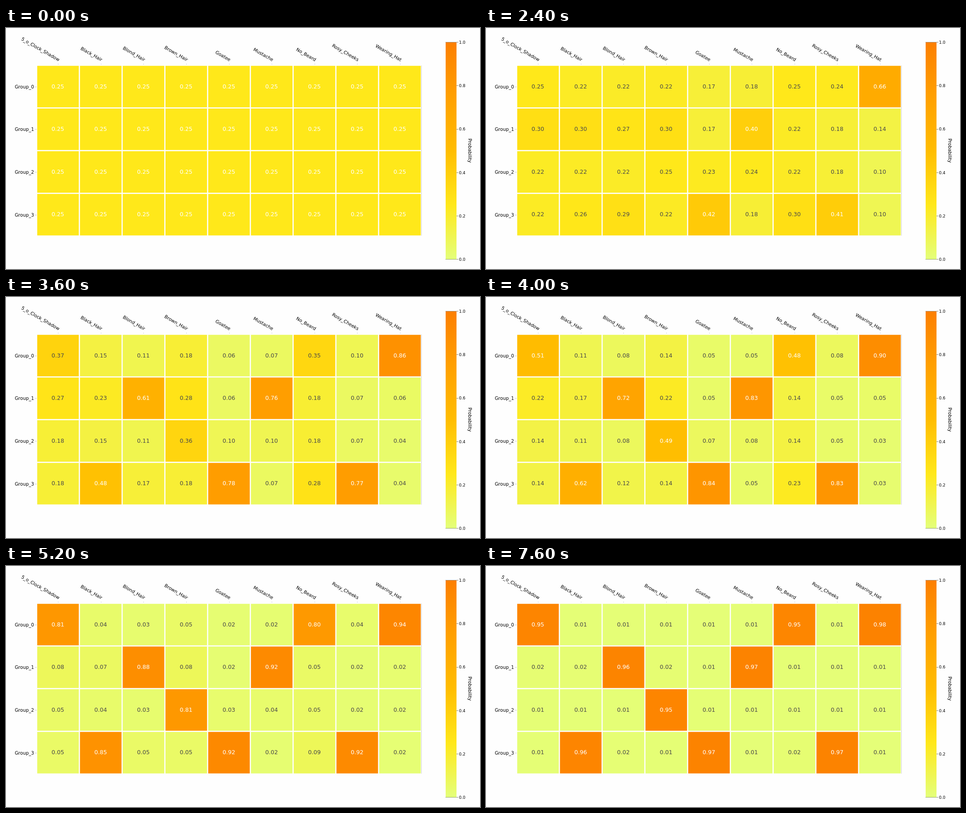
Animation, 1049 px wide and 534 px high, one loop 8 s. Source, as an HTML page with a canvas:

```html
<!DOCTYPE html>
<html lang="en">
<head>
<meta charset="utf-8">
<title>Group probabilities</title>
<style>
  html, body { margin: 0; width: 100%; height: 100%; overflow: hidden; background: #fefefe; }
  canvas { display: block; }
</style>
</head>
<body>
<canvas id="stage" width="1049" height="534"></canvas>
<script>
const ctx = document.getElementById('stage').getContext('2d');
const FONT = '"DejaVu Sans", sans-serif';
const STEP = 400, STEPS = 20, ROWS = 4;
const GRID = { x: 67.8, y: 82.5, size: 94.6, gap: 2.6 };
const BAR = { x: 973, y: 31.7, w: 24, h: 481 };
const STOPS = [[228, 255, 122], [255, 232, 26], [255, 189, 0], [255, 160, 0], [252, 127, 0]];

// top: group that wins, rival: runner-up, start: step at which the winner takes off
const COLUMNS = [
  { name: '5_o_Clock_Shadow', top: 0, rival: 1, start: 8.2 },
  { name: 'Black_Hair', top: 3, rival: 1, start: 7.4 },
  { name: 'Blond_Hair', top: 1, rival: 3, start: 6.5 },
  { name: 'Brown_Hair', top: 2, rival: 1, start: 8.3 },
  { name: 'Goatee', top: 3, rival: 2, start: 4.8 },
  { name: 'Mustache', top: 1, rival: 2, start: 5 },
  { name: 'No_Beard', top: 0, rival: 3, start: 8.4 },
  { name: 'Rosy_Cheeks', top: 3, rival: 0, start: 4.9 },
  { name: 'Wearing_Hat', top: 0, rival: 1, start: 3.1 }
];

// The winner's odds rise from 1:3 along a softened power curve;
// the others share the rest, the rival gaining a little more.
function columnAt({ top, rival, start }, step) {
  const rise = step ? Math.log1p(Math.exp(step - start)) : 0;
  const odds = 1 / 3 + 0.19 * rise ** 1.95;
  const lead = 1 + 0.6 * Math.min(step / 10, 1);
  const share = 1 / (1 + odds) / (ROWS - 2 + lead);
  return Array.from({ length: ROWS }, (_, r) =>
    r === top ? odds / (1 + odds) : r === rival ? share * lead : share);
}

function heat(p) {
  const s = p * 4, i = Math.min(Math.floor(s), 3);
  const mix = STOPS[i].map((a, n) => Math.round(a + (STOPS[i + 1][n] - a) * (s - i)));
  return `rgb(${mix})`;
}

function text(str, x, y, size, align, color = '#000', turn = 0) {
  ctx.save();
  ctx.translate(x, y);
  ctx.rotate(turn);
  ctx.font = `${size}px ${FONT}`;
  ctx.textAlign = align;
  ctx.fillStyle = color;
  ctx.fillText(str, 0, 0);
  ctx.restore();
}

function box(x, y, w, h, color) {
  ctx.fillStyle = color;
  ctx.fillRect(x, y, w, h);
}

function drawAxes() {
  COLUMNS.forEach(({ name }, c) => {
    const x = GRID.x + (c + 0.5) * GRID.size;
    text(name, x + 1, 74.2, 10.2, 'right', '#000', Math.PI / 6);
    box(Math.round(x), 79, 1, 2, '#ccc');
  });
  for (let r = 0; r < ROWS; r++) {
    const y = GRID.y + (r + 0.5) * GRID.size;
    text('Group_' + r, 62, y + 4, 10.2, 'right');
    box(64, Math.round(y), 4, 1, '#ccc');
  }
  box(919, 83, 1, 377, '#d0d0d0');
}

function drawBar() {
  const fill = ctx.createLinearGradient(0, BAR.y + BAR.h, 0, BAR.y);
  STOPS.forEach((_, i) => fill.addColorStop(i / 4, heat(i / 4)));
  box(BAR.x, BAR.y, BAR.w, BAR.h, fill);
  for (const y of [31, 512]) box(BAR.x - 0.5, y, BAR.w + 1, 1, 'rgba(0,0,0,.35)');
  for (let i = 0; i <= 5; i++) {
    const y = BAR.y + BAR.h * (1 - i / 5);
    box(997, Math.floor(y), 4, 1, '#888');
    text((i / 5).toFixed(1), 1002.6, y + 3.3, 8.8, 'left');
  }
  text('Probability', 1023, 271.7, 10.2, 'center', '#000', Math.PI / 2);
}

function drawCells(step) {
  const { size, gap } = GRID;
  const values = COLUMNS.map(column => columnAt(column, step));
  const half = Math.max(...values.flat()) / 2;
  values.forEach((column, c) => column.forEach((p, r) => {
    const x = GRID.x + c * size, y = GRID.y + r * size;
    box(x + gap / 2, y + gap / 2, size - gap, size - gap, heat(p));
    text(p.toFixed(2), x + size / 2 - 0.3, y + 51, 12.6, 'center', p > half ? '#fff' : '#4a4a4a');
  }));
}

let shown = -1;
function frame(now) {
  const step = Math.floor(now / STEP) % STEPS;
  if (step !== shown) {
    shown = step;
    box(0, 0, 1049, 534, '#fefefe');
    drawAxes();
    drawBar();
    drawCells(step);
  }
  requestAnimationFrame(frame);
}
frame(0);
</script>
</body>
</html>
```
